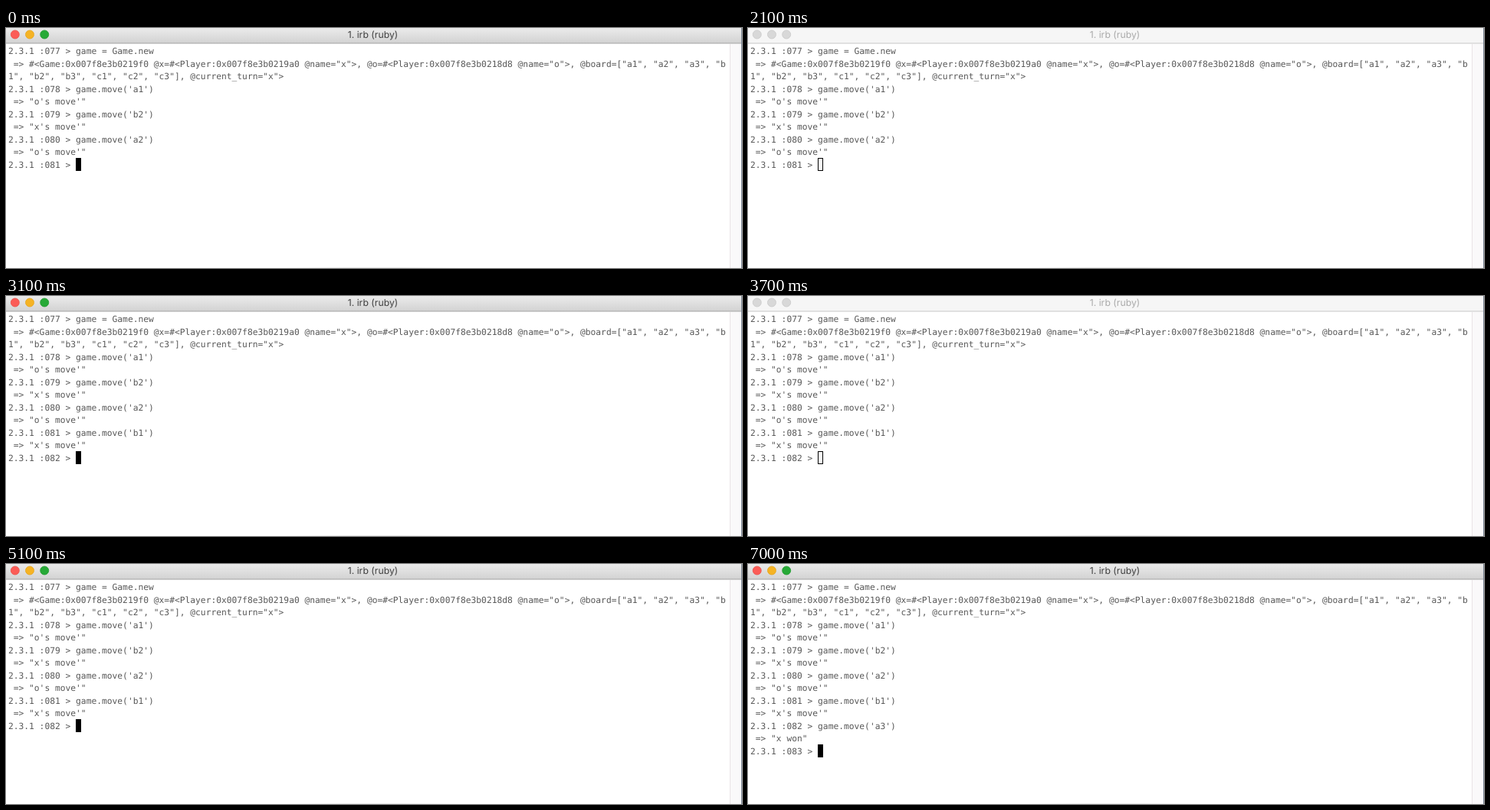
Write an HTML page with a canvas that moves like this. It is 960x314 px and loops after 7100 ms.

```html
<!DOCTYPE html>
<html lang="en">
<head>
<meta charset="utf-8">
<title>irb session</title>
<style>
  html, body { margin: 0; width: 100%; height: 100%; overflow: hidden; background: #fff; }
  canvas { display: block; }
</style>
</head>
<body>
<canvas id="stage" width="960" height="314"></canvas>
<script>
const ctx = document.getElementById('stage').getContext('2d');
const LOOP = 7100;
const LEFT = 2.9, TOP = 22.1, COLUMN = 6.787, ROW = 16.48;
const MONO = '11.28px "DejaVu Sans Mono", monospace';

const intro = [
  '2.3.1 :077 > game = Game.new',
  ' => #<Game:0x007f8e3b0219f0 @x=#<Player:0x007f8e3b0219a0 @name="x">, ' +
    '@o=#<Player:0x007f8e3b0218d8 @name="o">, @board=["a1", "a2", "a3", "b',
  '1", "b2", "b3", "c1", "c2", "c3"], @current_turn="x">',
];

// Each move is entered, with its reply, at time `at`.
const moves = [
  { at: 0, cell: 'a1', reply: "o's move'" },
  { at: 0, cell: 'b2', reply: "x's move'" },
  { at: 0, cell: 'a2', reply: "o's move'" },
  { at: 2700, cell: 'b1', reply: "x's move'" },
  { at: 6400, cell: 'a3', reply: 'x won' },
];

const unfocused = [[1300, 2400], [3700, 5000]];
const isFocused = t => !unfocused.some(([from, to]) => t >= from && t < to);

function box(x, y, w, h, fill) {
  ctx.fillStyle = fill;
  ctx.fillRect(x, y, w, h);
}

function fade(x0, y0, x1, y1, ...colors) {
  const g = ctx.createLinearGradient(x0, y0, x1, y1);
  colors.forEach((c, i) => g.addColorStop(i / (colors.length - 1), c));
  return g;
}

function drawTitleBar(focused) {
  box(0, 0, 960, 20, focused ? fade(0, 0, 0, 20, '#ebebeb', '#d2d2d2') : '#f6f6f6');
  box(0, 19.5, 960, 1, focused ? '#a4a4a4' : '#c8c8c8');
  const lights = focused
    ? [['#fb5c57', '#e9514b'], ['#f5b324', '#e5a520'], ['#27a937', '#209b2f']]
    : Array(3).fill(['#d8d8d8', '#c9c9c9']);
  lights.forEach(([fill, rim], i) => {
    ctx.beginPath();
    ctx.arc(11.8 + i * 19.2, 8.5, 5.5, 0, 2 * Math.PI);
    ctx.fillStyle = fill;
    ctx.fill();
    ctx.strokeStyle = rim;
    ctx.lineWidth = 0.8;
    ctx.stroke();
  });
  ctx.font = '12.25px Inter, sans-serif';
  ctx.textAlign = 'center';
  ctx.fillStyle = focused ? '#404040' : '#aaa';
  ctx.fillText('1. irb (ruby)', 478.5, 13.2);
}

function drawEdges() {
  box(944, 21, 1, 293, '#e9e3e6');
  box(945, 21, 14, 293, '#faf9fa');
  box(959, 0, 1, 314, '#7d8896');
  box(365, 313, 228, 1, fade(365, 0, 593, 0, '#fff', '#ececec', '#ececec', '#fff'));
}

function drawSession(t, focused) {
  const entered = moves.filter(m => t >= m.at);
  const prompt = n => `2.3.1 :0${78 + n} > `;
  const lines = [
    ...intro,
    ...entered.flatMap((m, n) => [`${prompt(n)}game.move('${m.cell}')`, ` => "${m.reply}"`]),
    prompt(entered.length),
  ];
  ctx.font = MONO;
  ctx.textAlign = 'left';
  ctx.fillStyle = '#585858';
  lines.forEach((line, i) => ctx.fillText(line, LEFT, TOP + i * ROW + 12.2));

  const x = Math.round(LEFT + lines.at(-1).length * COLUMN);
  const y = Math.floor(TOP + (lines.length - 1) * ROW);
  if (focused) {
    box(x, y, 7, 17, '#000');
  } else {
    ctx.strokeStyle = '#000';
    ctx.lineWidth = 1;
    ctx.strokeRect(x + 0.5, y + 0.5, 6, 16);
  }
}

function draw(now) {
  const t = now % LOOP;
  const focused = isFocused(t);
  ctx.textRendering = 'geometricPrecision';
  box(0, 0, 960, 314, '#fff');
  drawTitleBar(focused);
  drawEdges();
  drawSession(t, focused);
  requestAnimationFrame(draw);
}
requestAnimationFrame(draw);
</script>
</body>
</html>
```
